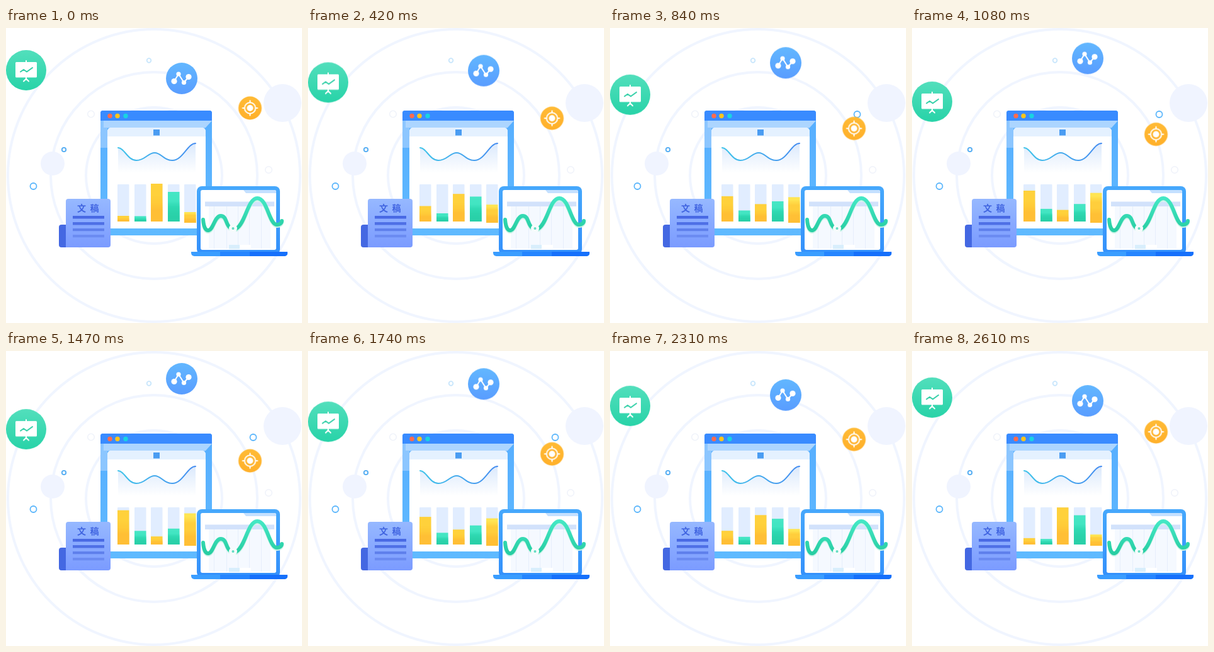
These frames come from a looping animation (470 by 468 pixels, 2640 ms). An HTML page:

```html
<!DOCTYPE html>
<html lang="zh">
<head>
<meta charset="utf-8">
<title>Dashboard illustration</title>
<style>
  html, body { margin: 0; width: 100%; height: 100%; overflow: hidden; background: #fff; }
  svg { display: block; width: 470px; height: 468px; }
  .round { fill: none; stroke-linecap: round; stroke-linejoin: round; }
</style>
</head>
<body>
<svg viewBox="0 0 470 468">
  <defs>
    <linearGradient id="frame" x2="0" y2="1"><stop stop-color="#57aeff"/><stop offset="1" stop-color="#5fbaff"/></linearGradient>
    <linearGradient id="line"><stop stop-color="#40c4ea"/><stop offset="1" stop-color="#468df0"/></linearGradient>
    <linearGradient id="area" x2="0" y2="1"><stop stop-color="#cfe2fb"/><stop offset="1" stop-color="#fff"/></linearGradient>
    <linearGradient id="paper" x2="0" y2="1"><stop stop-color="#96b8ff"/><stop offset="1" stop-color="#7b9bff"/></linearGradient>
    <linearGradient id="lid" x2="0" y2="1"><stop stop-color="#46a8fc"/><stop offset="1" stop-color="#3390fb"/></linearGradient>
    <linearGradient id="wave" gradientUnits="userSpaceOnUse" x1="0" x2="0" y1="268" y2="322"><stop stop-color="#45e8c6"/><stop offset="1" stop-color="#27cda2"/></linearGradient>
    <linearGradient id="green" x2="0" y2="1"><stop stop-color="#52dfbc"/><stop offset="1" stop-color="#28d3a8"/></linearGradient>
    <linearGradient id="blue" x2="0" y2="1"><stop stop-color="#62b7ff"/><stop offset="1" stop-color="#599dff"/></linearGradient>
    <linearGradient id="orange" x2="0" y2="1"><stop stop-color="#ffbb36"/><stop offset="1" stop-color="#ffb02a"/></linearGradient>
  </defs>

  <g fill="none" stroke="#f0f5ff" stroke-width="4">
    <circle cx="235" cy="234" r="232"/>
    <circle cx="235" cy="234" r="164"/>
    <circle cx="235" cy="234" r="108"/>
  </g>
  <g fill="#f0f4ff">
    <circle cx="439" cy="119" r="30"/>
    <circle cx="74" cy="215" r="19"/>
  </g>
  <g fill="#fff" stroke-width="1.8">
    <circle cx="227" cy="51.5" r="3.3" stroke="#c8e6fc"/>
    <circle cx="135" cy="136.5" r="5.3" stroke="#eff2fa" stroke-width="1.5"/>
    <circle cx="417" cy="225" r="5.3" stroke="#eff2fa" stroke-width="1.5"/>
    <circle cx="92" cy="193" r="3.2" stroke="#50abf2"/>
    <circle cx="43.5" cy="251" r="5" stroke="#5bb6fb"/>
    <circle cx="392.5" cy="137" r="5" stroke="#5bb6fb"/>
  </g>

  <!-- browser window -->
  <rect x="150" y="131" width="177" height="198" rx="4" fill="url(#frame)"/>
  <path d="M150 146H327L316 159H161V190H150Z" fill="#8cc6ff"/>
  <path d="M155 147H327L317 158H155Z" fill="#acd5ff"/>
  <path d="M150 147V135a4 4 0 0 1 4-4H323a4 4 0 0 1 4 4V147Z" fill="#398bff"/>
  <circle cx="165" cy="139.5" r="3.7" fill="#ff6b4e"/>
  <circle cx="177" cy="139.5" r="3.7" fill="#ffc41c"/>
  <circle cx="190" cy="139.5" r="3.7" fill="#19d3e2"/>
  <path d="M161 318V164a6 6 0 0 1 6-6H311a6 6 0 0 1 6 6V318Z" fill="#fff"/>
  <path d="M161 172V164a6 6 0 0 1 6-6H311a6 6 0 0 1 6 6V172Z" fill="#e4f1ff"/>
  <rect x="234" y="161" width="10" height="9.500" fill="#4a9cf2"/>
  <path d="M178 190C188 190 193 210 207 210C221 210 225 198 236 198C247 198 250 210 264 210C281 210 288 183 301 183V230H178Z" fill="url(#area)" opacity=".75"/>
  <path class="round" d="M178 190C188 190 193 210 207 210C221 210 225 198 236 198C247 198 250 210 264 210C281 210 288 183 301 183" stroke="url(#line)" stroke-width="2"/>
  <g id="bars"></g>

  <!-- laptop -->
  <rect x="303" y="251" width="132" height="108" rx="8" fill="url(#lid)"/>
  <rect x="309" y="257" width="120" height="95" rx="3" fill="#fff"/>
  <path d="M377 257H426a3 3 0 0 1 3 3V262H381Z" fill="#c4e0ff"/>
  <rect x="316" y="275.500" width="110" height="7.500" fill="#d2e2fb"/>
  <rect x="322" y="283" width="98" height="67" fill="#f5f9ff"/>
  <path d="M330.500 283V350M350.500 283V350M368.500 283V350M386.500 283V350M405.500 283V350" stroke="#e6eefb"/>
  <rect x="354" y="344" width="17" height="6.500" fill="#d8eefc"/>
  <rect x="371" y="344" width="18" height="6.500" fill="#fff"/>
  <path d="M294 355H447V357a5 5 0 0 1-5 5H299a5 5 0 0 1-5-5Z" fill="#3a9dff"/>
  <path d="M340 355H447V357a5 5 0 0 1-5 5H340Z" fill="#2585ff"/>
  <path d="M387 355H447V357a5 5 0 0 1-5 5H387Z" fill="#1670fb"/>
  <g class="round" stroke-width="6">
    <path id="curve" d="M313 304C314 316 317 321 321 321C329 321 331 298 341 298C350 298 349 311 355 316M366 318C380 310 384 270 399 270C415 270 418 312 430 312C435 312 438 309 438 306" transform="translate(0 2)" stroke="#c9f3e7"/>
    <path d="M313 304C314 316 317 321 321 321C329 321 331 298 341 298C350 298 349 311 355 316M366 318C380 310 384 270 399 270C415 270 418 312 430 312C435 312 438 309 438 306" stroke="url(#wave)"/>
  </g>
  <circle cx="360.500" cy="318" r="6.500" fill="#f6fbfc"/>
  <circle cx="360.500" cy="318" r="2" fill="#62dcc2"/>

  <!-- paper -->
  <path d="M96 312V348H88a4 4 0 0 1-4-4V316a4 4 0 0 1 4-4Z" fill="#4468e2"/>
  <path d="M95 348V275a4 4 0 0 1 4-4H162a4 4 0 0 1 4 4V344a4 4 0 0 1-4 4Z" fill="url(#paper)"/>
  <g font-family="'Noto Sans CJK SC','Noto Sans CJK',sans-serif" font-size="14" font-weight="700" fill="#4064e0">
    <text x="113" y="291">文</text><text x="133.500" y="291">稿</text>
  </g>
  <rect x="106" y="298" width="50" height="4.500" fill="#4869e4"/>
  <rect x="106" y="308" width="50" height="4.500" fill="#4f70e6"/>
  <rect x="106" y="318" width="50" height="4.200" fill="#5f80ec"/>
  <rect x="106" y="328" width="50" height="4.200" fill="#6b8bf2"/>

  <!-- floating badges -->
  <g id="board">
    <circle r="32" fill="url(#green)"/>
    <path class="round" d="M0-15V15M-4 17.500L0 13.500L4 17.500" stroke="#fff" stroke-width="2"/>
    <rect x="-17" y="-13" width="34" height="24.500" rx="1.500" fill="#fff"/>
    <path class="round" d="M-9 2.500L-4-1L1 2.500L10-4" stroke="#2fcfa6" stroke-width="2"/>
  </g>
  <g id="graph">
    <circle r="25" fill="url(#blue)"/>
    <path class="round" d="M-12 4.500L-5-7L3.500 6.500L11-2.500" stroke="#fff" stroke-width="2"/>
    <g fill="#fff">
      <circle cx="-12" cy="4.500" r="4.600"/><circle cx="-5" cy="-7" r="3.600"/>
      <circle cx="3.500" cy="6.500" r="3.600"/><circle cx="11" cy="-2.500" r="4.600"/>
    </g>
  </g>
  <g id="target">
    <circle r="18.500" fill="url(#orange)"/>
    <g stroke="#fff" stroke-width="2" fill="none">
      <circle r="8.700"/>
      <path d="M0-12.500V-8M0 8V12.500M-12.500 0H-8M8 0H12.500"/>
    </g>
    <circle r="5" fill="#fff"/>
  </g>
</svg>
<script>
const LOOP = 2640, TURN = 1350, TICK = 30;
const $ = id => document.getElementById(id);

// There and back at constant speed, one step per tick.
function swing(el, pose, from, mid, to = from) {
  el.animate([
    { transform: pose(from), easing: `steps(${TURN / TICK})` },
    { transform: pose(mid), offset: TURN / LOOP, easing: `steps(${(LOOP - TURN) / TICK})` },
    { transform: pose(to) }
  ], { duration: LOOP, iterations: Infinity });
}

function add(parent, tag, attrs) {
  const el = document.createElementNS("http://www.w3.org/2000/svg", tag);
  for (const k in attrs) el.setAttribute(k, attrs[k]);
  return parent.appendChild(el);
}

// Layers: [colour, share of the bar height], tallest first.
const gold = [["#ffd13b", 1], ["#ffbf35", .47]];
const mint = [["#45e6c4", 1], ["#2fd9b2", .62], ["#29d0a8", .32]];
const lemon = [["#ffe552", 1], ["#ffce3c", .79], ["#ffbf35", .36]];

// x, bottom, start height, turning height, layers
const bars = [
  [177, 307, 9, 59, gold],
  [204, 307, 8.5, 23, mint],
  [230, 307, 60, 8, gold],
  [257, 307, 47, 23, mint],
  [283, 309, 17, 55, lemon]
];
for (const [x, bottom, from, mid, layers] of bars) {
  const g = add($("bars"), "g", { transform: `translate(${x} ${bottom})` });
  add(g, "rect", { y: 248 - bottom, width: 18.5, height: bottom - 248, rx: 1, fill: "#e1edff" });
  const fill = add(g, "g", {});
  for (const [color, part] of layers)
    add(fill, "rect", { y: -part, width: 18.5, height: part, fill: color });
  swing(fill, h => `scale(1, ${h})`, from, mid);
}

const float = (id, x, ...ys) => swing($(id), y => `translate(${x}px, ${y}px)`, ...ys);
float("board", 32, 67, 129.4, 72.6);
float("graph", 279, 80, 40.3);
float("target", 387.5, 127, 179);
</script>
</body>
</html>
```
